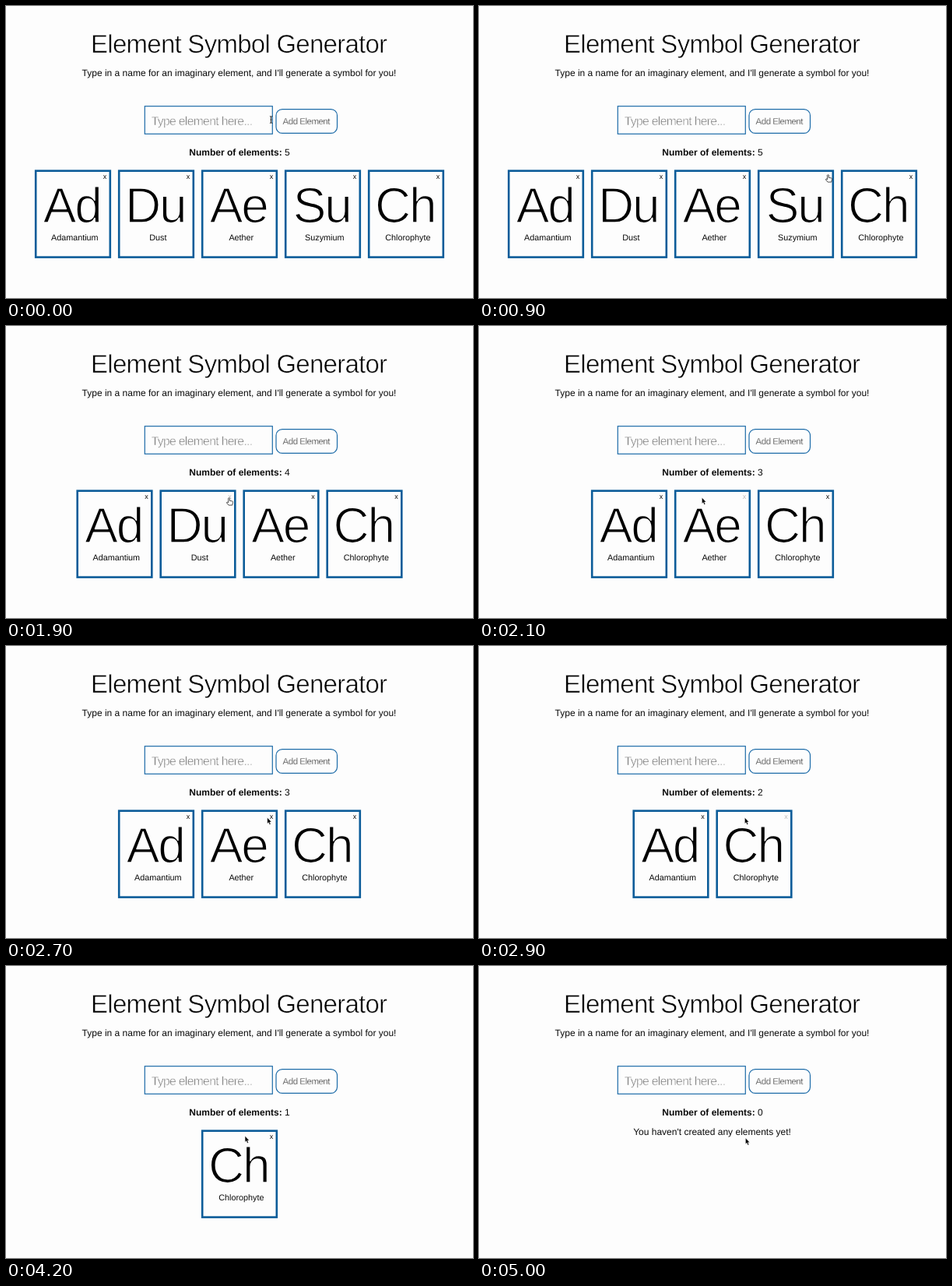
An HTML page that plays this animation: 600 by 375 pixels, repeating every 5.1 s.

```html
<!DOCTYPE html>
<html lang="en">
<head>
<meta charset="utf-8">
<title>Element Symbol Generator</title>
<style>
  html, body { margin: 0; width: 100%; height: 100%; overflow: hidden; background: #fdfdfd; }
  svg { display: block; width: 600px; height: 375px; }
  text {
    font: 12px "Liberation Sans", Arial, sans-serif;
    fill: #0a0a0a; text-anchor: middle; text-rendering: geometricPrecision;
  }
  /* A background-coloured outline thins the letters to a light weight. */
  .light { stroke: #fdfdfd; stroke-linejoin: round; }
  .title { font-size: 33px; letter-spacing: -.74px; stroke-width: .65px; fill: #000; }
  .hint { font-size: 15.7px; letter-spacing: -.66px; stroke-width: .5px; fill: #777; text-anchor: start; }
  .button { font-size: 11.5px; letter-spacing: -.5px; stroke-width: .35px; fill: #222; }
  .symbol { font-size: 64px; letter-spacing: -2.2px; stroke-width: 1.5px; fill: #000; }
  .name { font-size: 10.8px; }
  .close { font-size: 9px; }
  .faded { fill: #bbb; }
  .bold { font-weight: bold; }
  .box { fill: none; stroke: #1c6ba8; stroke-width: 1.2; }
  .card { fill: none; stroke: #0b5c99; stroke-width: 2.6; }
  .hand { fill: #fff; stroke: #222; stroke-width: .8; stroke-linejoin: round; }
  .beam { fill: none; stroke: #222; stroke-width: 1; }
</style>
</head>
<body>
<svg viewBox="0 0 600 375">
  <text class="light title" x="299.2" y="60">Element Symbol Generator</text>
  <text x="299.5" y="89.6">Type in a name for an imaginary element, and I'll generate a symbol for you!</text>
  <rect class="box" x="178.3" y="128.7" width="164" height="35.6"/>
  <text class="light hint" x="186.7" y="152.8">Type element here...</text>
  <rect class="box" x="347" y="132.6" width="78.5" height="30.8" rx="8"/>
  <text class="light button" x="385.8" y="152.2">Add Element</text>
  <text x="300" y="192"><tspan class="bold">Number of elements:</tspan> <tspan id="count"></tspan></text>
  <g id="cards"></g>
  <g id="cursor"></g>
</svg>
<script>
const LOOP = 5100, STEP = 100;
const CARD_WIDTH = 99, PITCH = 107;
const names = ["Adamantium", "Dust", "Aether", "Suzymium", "Chlorophyte"];

// Each removal leaves the close mark at that index faded until the given time.
const removals = [
  { time: 1000, index: 3, fadedUntil: 1300 },
  { time: 2100, index: 1, fadedUntil: 2300 },
  { time: 2900, index: 1, fadedUntil: 3000 },
  { time: 3800, index: 0, fadedUntil: 3900 },
  { time: 4600, index: 0, fadedUntil: 4600 }
];

// Pointer moves: start time, end time, destination.
const moves = [
  [0, 900, 448.5, 216.4],
  [1300, 1900, 286.5, 220.4],
  [2300, 2800, 341.5, 220.4],
  [3200, 3700, 288.5, 217.4],
  [4000, 4500, 341.5, 220.4],
  [4600, 4700, 342.5, 221]
];

const pointers = {
  beam: '<path class="beam" d="M-1.5 0.5Q0 .5 0 2V8Q0 9.5-1.5 9.5M1.5 .5Q0 .5 0 2V8Q0 9.5 1.5 9.5M-1 5H1"/>',
  arrow: '<path d="M0 0V7.5L1.7 6L2.9 9L4.2 8.4L3 5.6H5.2Z" stroke="#fff" stroke-width=".3"/>',
  hand: '<path class="hand" d="M-.8 .8Q.1-.3 .9 .8V4L4.3 4.6Q5.2 4.9 5 6L4.2 9.7H-.4L-3.2 6.4Q-2.8 5-.8 6.4Z"/>'
};

const ease = p => p * p * (3 - 2 * p);
const find = id => document.getElementById(id);

function pointerAt(time) {
  let x = 340.5, y = 141;
  for (const [start, end, toX, toY] of moves) {
    if (time <= start) break;
    const p = ease(Math.min(1, (time - start) / (end - start)));
    x += (toX - x) * p;
    y += (toY - y) * p;
  }
  return { x, y };
}

function cardMarkup(name, left, faded) {
  const middle = left + CARD_WIDTH / 2;
  return `<rect class="card" x="${left + 1.7}" y="211.7" width="${CARD_WIDTH - 3.4}" height="110.9"/>
    <text class="close ${faded ? "faded" : ""}" x="${left + 90.5}" y="222">x</text>
    <text class="light symbol" x="${middle - 1.4}" y="278">${name.slice(0, 2)}</text>
    <text class="name" x="${middle + 2.3}" y="300.7">${name}</text>`;
}

function draw(time) {
  const remaining = [...names];
  let fadedIndex = -1;
  for (const { time: removedAt, index, fadedUntil } of removals) {
    if (time < removedAt) break;
    remaining.splice(index, 1);
    if (time < fadedUntil) fadedIndex = index;
  }

  const { x, y } = pointerAt(time);
  const firstLeft = 300 - ((remaining.length - 1) * PITCH + CARD_WIDTH) / 2;
  let hovering = false;
  const cards = remaining.map((name, i) => {
    const left = firstLeft + i * PITCH;
    const hovered = Math.hypot(x - left - 90.5, y - 219) < 5;
    hovering ||= hovered;
    return cardMarkup(name, left, hovered || i === fadedIndex);
  });

  find("count").textContent = remaining.length;
  find("cards").innerHTML = cards.join("") ||
    '<text x="299.5" y="217">You haven\'t created any elements yet!</text>';
  const pointer = time < STEP ? "beam" : hovering ? "hand" : "arrow";
  find("cursor").innerHTML = `<g transform="translate(${x} ${y})">${pointers[pointer]}</g>`;
}

let shown = -1;
function tick() {
  const time = Math.floor(performance.now() % LOOP / STEP) * STEP;
  if (time !== shown) draw(shown = time);
  requestAnimationFrame(tick);
}
tick();
</script>
</body>
</html>
```
